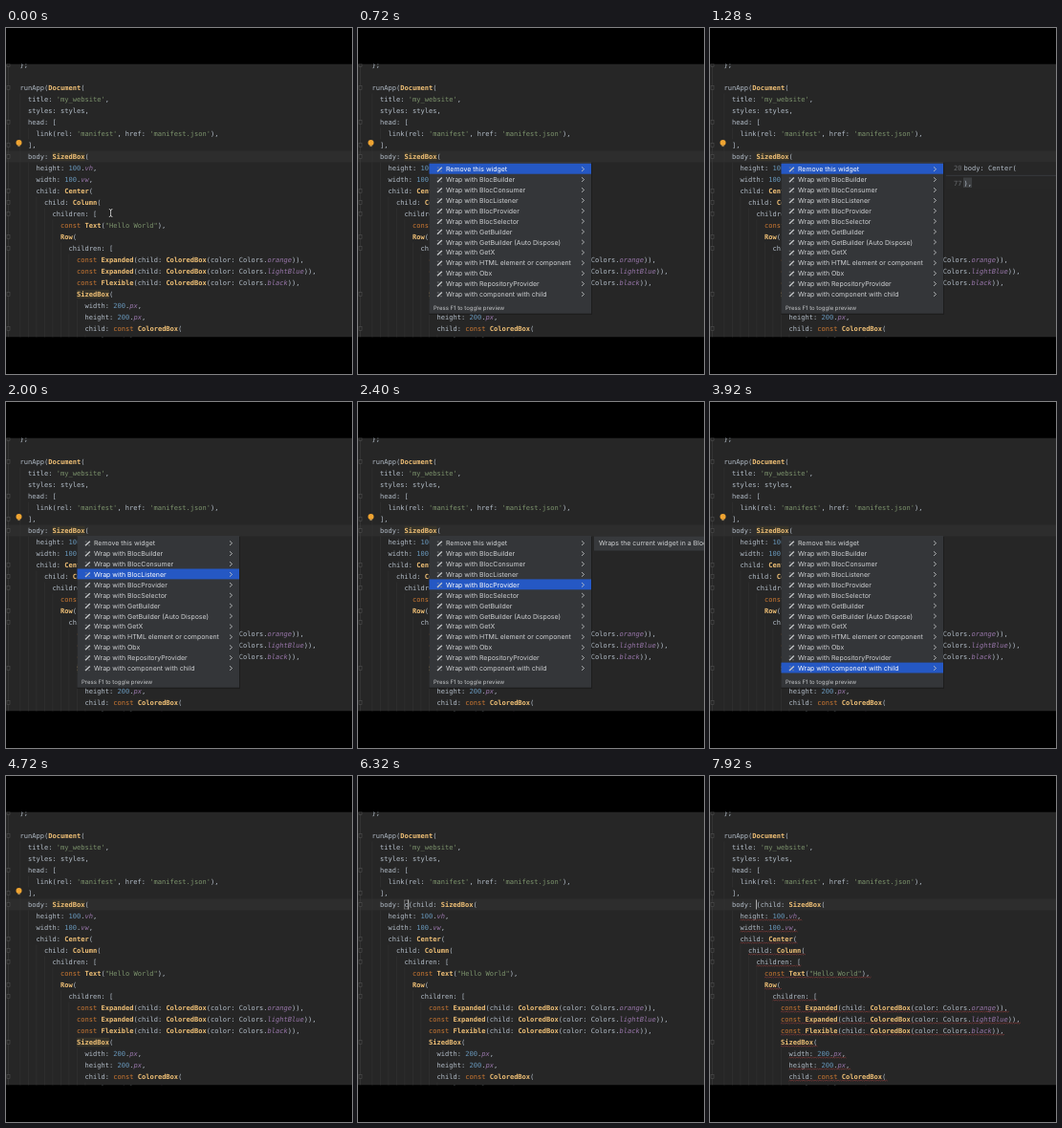
Animation, 362 px wide and 362 px high, one loop 8000 ms. Source, as an HTML page:

```html
<!DOCTYPE html>
<html lang="en">
<head>
<meta charset="utf-8">
<title>Editor refactoring</title>
<style>
html, body { margin: 0; width: 100%; height: 100%; overflow: hidden; background: #000; }
svg { display: block; width: 100vw; height: 100vh; }
text { white-space: pre; text-rendering: geometricPrecision; }
.code { font: 7.06px "DejaVu Sans Mono", monospace; fill: #b3bdc8; }
.ui { font: 6.95px Inter, sans-serif; fill: #d0d2d4; }
.hint { font-size: 6px; fill: #c4c6c8; }
.type { fill: #f0c076; font-weight: bold; }
.key { fill: #cc7832; }
.str { fill: #7c936c; }
.num { fill: #6897bb; }
.unit { fill: #9876aa; font-style: italic; }
</style>
</head>
<body>
<script>
const LOOP = 8000, CHAR = 4.25, LEFT = 14.5, LINE = 12, FIRST = 62.5;
const TOP = 37.5, BOTTOM = 323.5;
const BODY_ROW = 6;

const lines = [
  "runApp(Document(",
  "  title: 'my_website',",
  "  styles: styles,",
  "  head: [",
  "    link(rel: 'manifest', href: 'manifest.json'),",
  "  ],",
  "  ",
  "    height: 100.vh,",
  "    width: 100.vw,",
  "    child: Center(",
  "      child: Column(",
  "        children: [",
  "          const Text(\"Hello World\"),",
  "          Row(",
  "            children: [",
  "              const Expanded(child: ColoredBox(color: Colors.orange)),",
  "              const Expanded(child: ColoredBox(color: Colors.lightBlue)),",
  "              const Flexible(child: ColoredBox(color: Colors.black)),",
  "              SizedBox(",
  "                width: 200.px,",
  "                height: 200.px,",
  "                child: const ColoredBox(",
  "                  color: Colors.red,"
];
const foldRows = [-2, 0, 3, 5, 6, 9, 10, 11, 13, 14, 18, 21];

const actions = [
  "Remove this widget", "Wrap with BlocBuilder", "Wrap with BlocConsumer",
  "Wrap with BlocListener", "Wrap with BlocProvider", "Wrap with BlocSelector",
  "Wrap with GetBuilder", "Wrap with GetBuilder (Auto Dispose)", "Wrap with GetX",
  "Wrap with HTML element or component", "Wrap with Obx",
  "Wrap with RepositoryProvider", "Wrap with component with child"
];
const ROW_H = 10.9;

// Each track is a list of [start time, value]; values hold until the next step.
const tracks = {
  pointer: [[0, true], [480, false]],
  menu: [[0, false], [560, true], [4160, false]],
  selected: [[0, 0], [1840, 1], [1920, 2], [2000, 3], [2080, 4], [2480, 5], [2560, 6],
    [2640, 7], [2720, 8], [2800, 9], [2880, 10], [3680, 11], [3840, 12]],
  popup: [[0, ""], [800, "preview"], [1840, ""], [2240, "BlocProvider"], [2480, ""],
    [3200, "Obx widget"], [3680, ""]],
  wrapped: [[0, false], [4880, true]],
  typed: [[0, 9], [6240, 5], [6320, 1], [6400, 0]],
  errors: [[0, false], [7360, true]]
};
const at = (track, t) => track.reduce((value, [start, next]) => t >= start ? next : value, track[0][1]);

const NS = "http://www.w3.org/2000/svg";
function add(parent, tag, attrs = {}, text) {
  const el = document.createElementNS(NS, tag);
  for (const k in attrs) el.setAttribute(k, attrs[k]);
  if (text !== undefined) el.textContent = text;
  return parent.appendChild(el);
}
const rect = (parent, x, y, width, height, fill, more) =>
  add(parent, "rect", { x, y, width, height, fill, ...more });
const path = (parent, d, stroke, width = 0.6) =>
  add(parent, "path", { d, stroke, "stroke-width": width, fill: "none" });
const show = (el, on) => el.setAttribute("visibility", on ? "visible" : "hidden");

const TOKEN = /('[^']*'|"[^"]*")|(\bconst\b)|(\b\d+\b)|((?<=\.)(?:vh|vw|px|orange|lightBlue|black|red)\b)|(\b[A-Z]\w*(?=\())/g;
const KINDS = ["str", "key", "num", "unit", "type"];
function paint(el, source) {
  el.textContent = "";
  let end = 0;
  for (const m of source.matchAll(TOKEN)) {
    add(el, "tspan", {}, source.slice(end, m.index));
    add(el, "tspan", { class: KINDS[m.slice(1).findIndex(Boolean)] }, m[0]);
    end = m.index + m[0].length;
  }
  add(el, "tspan", {}, source.slice(end));
}
function codeText(parent, x, y, source) {
  const el = add(parent, "text", { class: "code", x, y: y + 2.5 });
  paint(el, source);
  return el;
}

const rowY = row => FIRST + row * LINE;
const indentOf = source => source.match(/^ */)[0].length;
const colX = col => LEFT + col * CHAR;

const svg = add(document.body, "svg", { viewBox: "0 0 362 362" });
rect(svg, 0, 0, 362, 362, "#000");
const view = add(svg, "svg", {
  x: 0, y: TOP, width: 362, height: BOTTOM - TOP, viewBox: `0 ${TOP} 362 ${BOTTOM - TOP}`
});
rect(view, 0, TOP, 362, BOTTOM - TOP, "#262626");
rect(view, 0, rowY(BODY_ROW) - 6, 362, LINE, "#2d2d2d");

// Gutter
path(view, `M2.5 ${TOP}V${BOTTOM}`, "#414141", 0.5);
for (const row of foldRows)
  rect(view, 1, rowY(row) - 1.8, 3, 3.6, "#262626", { stroke: "#555", "stroke-width": 0.5 });

// Indent guides run below a line for as long as the code stays deeper
lines.forEach((source, row) => {
  const col = indentOf(source);
  let last = row;
  while (last + 1 < lines.length && indentOf(lines[last + 1]) > col) last++;
  if (last > row) path(view, `M${colX(col) + 0.4} ${rowY(row) + 6}V${rowY(last) + 6}`, "#373737", 0.5);
});

// Highlighted uses of the name under the caret
const uses = add(view, "g");
for (const [col, row] of [[8, BODY_ROW], [14, 18]])
  rect(uses, colX(col), rowY(row) - 4.7, 8 * CHAR, 9.4, "#37342a");

// Template variable, resized while it is being erased
const field = rect(view, colX(8), rowY(BODY_ROW) - 4.5, 0, 9, "none", { stroke: "#9a9a9a", "stroke-width": 0.5 });

codeText(view, LEFT, rowY(-2), "};");
const body = codeText(view, colX(2), rowY(BODY_ROW), "");
lines.forEach((source, row) => codeText(view, colX(indentOf(source)), rowY(row), source.trim()));

function squiggle(x, end, y) {
  let d = `M${x} ${y}`;
  for (let up = 1; x < end; up = 1 - up) d += `L${x += 1.2} ${y - up}`;
  return d;
}
const errors = add(view, "g");
lines.slice(BODY_ROW + 1).forEach((source, i) =>
  path(errors, squiggle(colX(indentOf(source)), colX(source.length), rowY(BODY_ROW + 1 + i) + 4.6), "#a8403e", 0.5));

const caret = rect(view, 0, rowY(BODY_ROW) - 5, 0.8, 10, "#d0d0d0");

const bulb = add(view, "g");
add(bulb, "circle", { cx: 13.5, cy: 120, r: 3, fill: "#f0a431" });
rect(bulb, 12.4, 122.8, 2.2, 1.3, "#a88a58");

const pointer = add(view, "g");
const beam = "M107.8 189.5Q109.6 189.5 109.6 191V196Q109.6 197.5 107.8 197.5M111.4 189.5Q109.6 189.5 109.6 191M109.6 196Q109.6 197.5 111.4 197.5";
path(pointer, beam, "#111", 1.8);
path(pointer, beam, "#eee", 0.8);

// Action menu
const menu = add(view, "g");
rect(menu, 74, 141, 171, 159, "#000", { opacity: 0.25 });
rect(menu, 74.5, 140, 169.5, 158.7, "#343639");
const bar = rect(menu, 74.5, 0, 169.5, ROW_H, "#2558c4");
const labels = actions.map((label, i) => {
  const y = 147.7 + i * ROW_H;
  path(menu, `M83 ${y + 2.6}L87.8 ${y - 2}`, "#c6c8ca", 1.4);
  path(menu, `M82.8 ${y - 1.6}h1.8m1.5 3.8h1.8`, "#8d9093", 0.7);
  path(menu, `M234 ${y - 2.3}l2.6 2.3l-2.6 2.3`, "#c6c8ca", 0.8);
  return add(menu, "text", { class: "ui", x: 92, y: y + 2.5 }, label);
});
add(menu, "text", { class: "ui hint", x: 79, y: 295 }, "Press F1 to toggle preview");

// Popups beside the menu
const preview = add(view, "g");
rect(preview, 247, 140.5, 120, 28, "#272727");
rect(preview, 247, 153.8, 120, 1.2, "#343639");
rect(preview, 265, 156.5, 9, 10.5, "#3c3e40");
for (const [number, y, source] of [["20", 146.5, "body: Center("], ["77", 162, "),"]]) {
  add(preview, "text", { class: "code", x: 255, y: y + 2.5, style: "fill:#686b6e" }, number);
  add(preview, "text", { class: "code", x: 265.5, y: y + 2.5 }, source);
}
const tip = add(view, "g");
rect(tip, 247, 140.5, 120, 15, "#37393c");
const tipText = add(tip, "text", { class: "ui", x: 252, y: 150.4 });

let bodyKey;
function render(t) {
  const s = {};
  for (const name in tracks) s[name] = at(tracks[name], t);

  show(pointer, s.pointer);
  show(bulb, !s.wrapped);
  show(uses, !s.wrapped);
  show(field, s.wrapped && s.typed > 0);
  show(caret, s.wrapped);
  show(errors, s.errors);
  show(menu, s.menu);
  show(preview, s.popup === "preview");
  show(tip, s.popup && s.popup !== "preview");

  const key = s.wrapped + ":" + s.typed;
  if (key !== bodyKey) {
    bodyKey = key;
    const name = "component".slice(0, s.typed);
    paint(body, "body: " + (s.wrapped ? name + "(child: SizedBox(" : "SizedBox("));
    field.setAttribute("width", s.typed * CHAR);
    caret.setAttribute("x", colX(8 + s.typed) - 0.4);
  }
  bar.setAttribute("y", 141.8 + s.selected * ROW_H);
  labels.forEach((el, i) => { el.style.fill = i === s.selected ? "#fff" : ""; });
  tipText.textContent = "Wraps the current widget in a" + (s.popup[0] === "O" ? "n " : " ") + s.popup;
}

function tick() {
  render(performance.now() % LOOP);
  requestAnimationFrame(tick);
}
tick();
</script>
</body>
</html>
```
